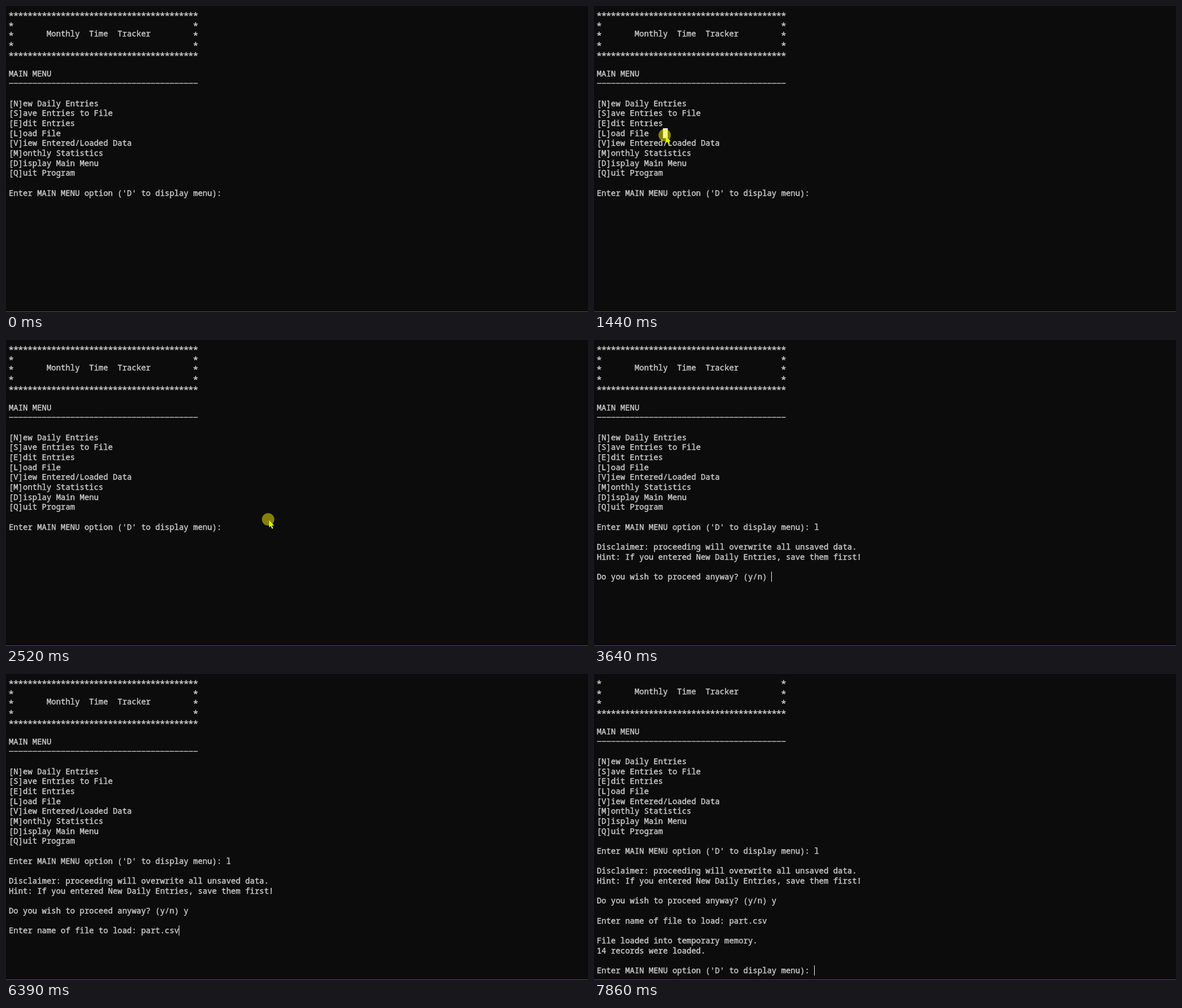
An HTML page with a canvas for the animation above (8000 ms loop, 1031 by 543 pixels).

```html
<!DOCTYPE html>
<html lang="en">
<head>
<meta charset="utf-8">
<title>Monthly Time Tracker</title>
<style>
html, body { margin: 0; width: 100%; height: 100%; overflow: hidden; background: #0c0c0c; }
canvas { display: block; }
</style>
</head>
<body>
<canvas id="stage" width="1031" height="543"></canvas>
<script>
const ctx = document.getElementById('stage').getContext('2d');
const W = 1031, H = 543, LOOP = 8000;
const PAD = 5, CELL_W = 8.373, CELL_H = 17.66, ROWS = 30;
const BG = '#0c0c0c', INK = '#cccccc';
const FACE = 'px "Noto Sans Mono", "DejaVu Sans Mono", monospace';

const PROMPT = "Enter MAIN MENU option ('D' to display menu): ";
const STARS = '*'.repeat(40);
const SIDES = '*' + ' '.repeat(38) + '*';
const MENU = [
  STARS, SIDES, '*       Monthly  Time  Tracker         *', SIDES, STARS,
  '', 'MAIN MENU', '-'.repeat(40), '',
  '[N]ew Daily Entries', '[S]ave Entries to File', '[E]dit Entries', '[L]oad File',
  '[V]iew Entered/Loaded Data', '[M]onthly Statistics', '[D]isplay Main Menu',
  '[Q]uit Program', '', PROMPT
].join('\n');

// Terminal output and key presses: [time, appended text]
const OUTPUT = [
  [0, MENU],
  [3170, 'l'],
  [3570, '\n\nDisclaimer: proceeding will overwrite all unsaved data.' +
    '\nHint: If you entered New Daily Entries, save them first!' +
    '\n\nDo you wish to proceed anyway? (y/n) '],
  [4730, 'y'],
  [4920, '\n\nEnter name of file to load: '],
  ...[...'part.csv'].map((c, i) => [5520 + i * 124, c]),
  [6720, '\n\nFile loaded into temporary memory.\n14 records were loaded.\n\n' + PROMPT]
];

// Pointer glides: start, end, and where it arrives
const ENTRY = [778, 527];
const GLIDES = [
  { from: 220, to: 373, x: 323, y: 414 },
  { from: 450, to: 910, x: 154, y: 291 },
  { from: 910, to: 1290, x: 127, y: 231 },
  { from: 1370, to: 1750, x: 21, y: 227 },
  { from: 1826, to: 2370, x: 466, y: 320 }
];
const DRAG = 1370, RELEASE = 1900, CLICK = 2445, CLICK_END = 2605;
const SELECT_ROW = 12, SELECT_END = 15;

const between = (t, a, b) => t >= a && t < b;
const colX = col => PAD + col * CELL_W;

function pointerAt(t) {
  const step = 76.6;                       // the pointer moves in steps
  t = 220 + Math.floor((t - 216) / step) * step;
  let [x, y] = ENTRY;
  for (const g of GLIDES) {
    const k = Math.max(0, Math.min(1, (t - g.from) / (g.to - g.from)));
    const ease = k * k * (3 - 2 * k);
    x += (g.x - x) * ease;
    y += (g.y - y) * ease;
  }
  return [x, y];
}

// Blinks from the latest output on; before any typing it shows once, on focus
function caretOn(t, last) {
  if (!last) return between(t, 1450, 1980);
  return Math.floor(Math.max(0, t - last - 80) / 530) % 2 === 0;
}

function drawChar(c, x, top) {
  if (c === ' ') return;
  if (c === '-') return ctx.fillRect(x + 0.3, top + 8, 7.8, 1.3);
  let base = top + 13.7;
  ctx.font = (c === '*' ? 17 : 13.955) + FACE;
  if (c === '*') {
    // centre the larger star in its cell
    const m = ctx.measureText(c);
    base = top + 9.4 + (m.actualBoundingBoxAscent - m.actualBoundingBoxDescent) / 2;
    x += (CELL_W - m.width) / 2;
  }
  ctx.fillText(c, x, base);
  ctx.strokeText(c, x, base);
}

function drawPointer(x, y, pressed) {
  if (pressed) {
    ctx.fillStyle = 'rgba(255,245,0,.5)';
    ctx.beginPath();
    ctx.arc(x - 1.7, y - 1.7, 11, 0, 7);
    ctx.fill();
  }
  ctx.fillStyle = '#d6f50a';
  ctx.beginPath();
  for (const [dx, dy] of [[0, 0], [0, 12.5], [3, 10], [5.2, 15], [7.3, 14], [5.2, 9.4], [9, 9]])
    ctx.lineTo(x + dx, y + dy);
  ctx.fill();
}

function draw(t) {
  ctx.fillStyle = BG;
  ctx.fillRect(0, 0, W, H);
  ctx.fillStyle = '#55551a';
  ctx.fillRect(0, H - 1, W, 1);
  ctx.lineWidth = 0.4;

  const shown = OUTPUT.filter(o => o[0] <= t);
  const lines = shown.map(o => o[1]).join('').split('\n');
  const scroll = Math.max(0, lines.length - ROWS);
  const rowY = row => PAD + (row - scroll) * CELL_H;
  const [px, py] = pointerAt(t);

  let selectFrom = SELECT_END;
  if (between(t, DRAG, CLICK)) {
    selectFrom = Math.floor((pointerAt(Math.min(t, 1800))[0] - PAD) / CELL_W);
    ctx.fillStyle = '#fff';
    ctx.fillRect(colX(selectFrom), rowY(SELECT_ROW), (SELECT_END - selectFrom) * CELL_W, CELL_H);
  }

  lines.slice(scroll).forEach((line, i) => {
    const row = i + scroll;
    [...line].forEach((c, col) => {
      const picked = row === SELECT_ROW && between(col, selectFrom, SELECT_END);
      ctx.fillStyle = ctx.strokeStyle = picked ? BG : INK;
      drawChar(c, colX(col), rowY(row));
    });
  });

  if (caretOn(t, shown.at(-1)[0])) {
    const row = lines.length - 1;
    ctx.fillStyle = '#f2f2f2';
    ctx.fillRect(Math.floor(colX(lines[row].length)), Math.floor(rowY(row)), 1, 18);
  }

  const pressed = between(t, DRAG, RELEASE) || between(t, CLICK, CLICK_END);
  if (between(t, 218, 3240) || between(t, 3920, 4730)) drawPointer(px, py, pressed);
}

const start = performance.now();
function tick() {
  draw((performance.now() - start) % LOOP);
  requestAnimationFrame(tick);
}
tick();
</script>
</body>
</html>
```
